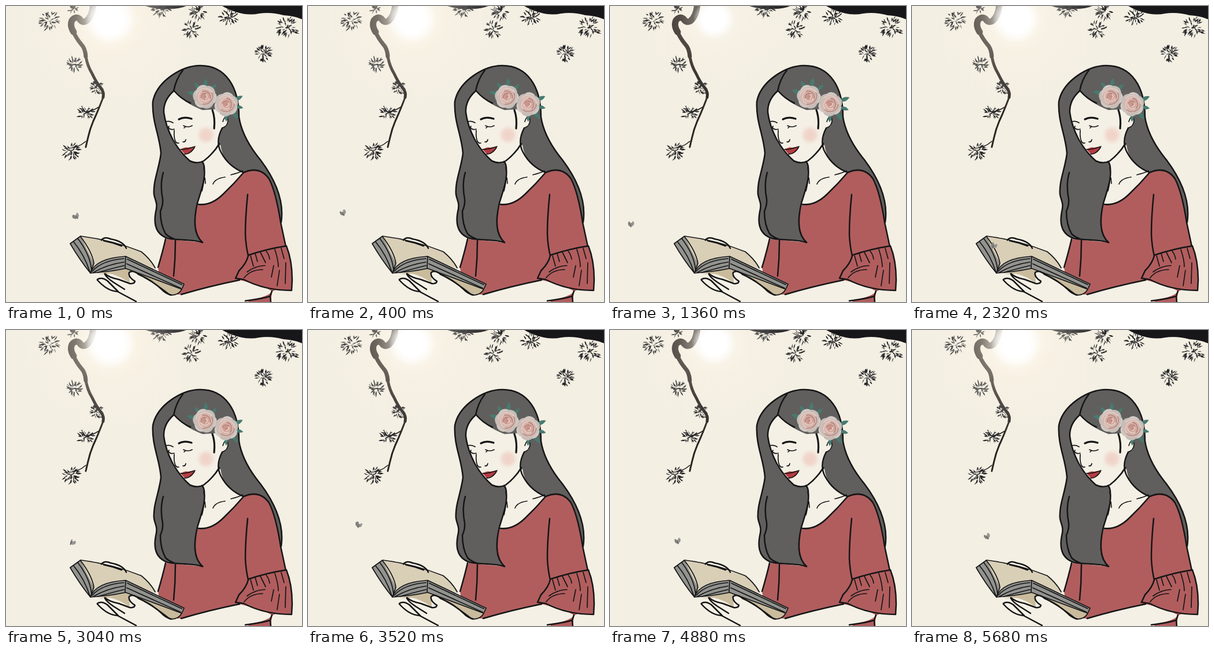
An HTML page for the animation above (5760 ms loop, 512 by 512 pixels).

```html
<!DOCTYPE html>
<html lang="en">
<head>
<meta charset="utf-8">
<title>Reading under the tree</title>
<style>
html, body { margin: 0; width: 100%; height: 100%; overflow: hidden; background: #f4efe3; }
svg { display: block; width: 100vw; height: 100vh; }
.ln { fill: none; stroke: #151516; stroke-width: 2.5; stroke-linecap: round; stroke-linejoin: round; }
.thin { stroke-width: 1.7; }
.bold { stroke-width: 3.2; }
.skin { fill: #f4f0e5; }
.hair { fill: #605f5d; }
.dress { fill: #b15d5e; }
.page { fill: #d9cfb7; }
.cover { fill: #c9bb9c; }
.edge { fill: #92928e; }
</style>
</head>
<body>
<svg viewBox="0 0 512 512">
  <defs>
    <radialGradient id="sun">
      <stop offset="0" stop-color="#fff"/>
      <stop offset=".55" stop-color="#fff"/>
      <stop offset="1" stop-color="#fff" stop-opacity="0"/>
    </radialGradient>
    <radialGradient id="haze">
      <stop offset="0" stop-color="#fff"/>
      <stop offset=".2" stop-color="#fffaf0" stop-opacity=".75"/>
      <stop offset=".35" stop-color="#fdf5e5" stop-opacity=".42"/>
      <stop offset=".6" stop-color="#faf4e6" stop-opacity=".2"/>
      <stop offset="1" stop-color="#f8f2e5" stop-opacity="0"/>
    </radialGradient>
    <radialGradient id="blush">
      <stop offset="0" stop-color="#f0d1c7"/>
      <stop offset=".5" stop-color="#f0d3c9" stop-opacity=".85"/>
      <stop offset="1" stop-color="#f3e2d8" stop-opacity="0"/>
    </radialGradient>
    <radialGradient id="petal">
      <stop offset="0" stop-color="#c28a80"/>
      <stop offset=".5" stop-color="#d6aea4"/>
      <stop offset="1" stop-color="#cbc0ba"/>
    </radialGradient>
  </defs>
  <rect width="512" height="512" fill="#f4efe3"/>

  <g id="tree" fill="#17171a">
    <path d="M374 0Q386 7 400 11Q420 17 438 13Q458 10 480 16Q498 17 512 23V0Z"/>
    <path d="M241 0Q262 7 283 5Q300 5 312 0Z"/>
    <g class="ln" style="stroke:#2a2421">
      <path stroke-width="11" style="stroke-width:11" d="M151-4Q150 17 139 26Q132 30 127 22Q120 17 114 25Q110 34 117 45"/>
      <path style="stroke-width:7" d="M117 45Q121 55 130 66Q137 73 138 87"/>
      <path style="stroke-width:5" d="M138 87Q141 104 149 117Q156 132 164 142Q170 149 168 158"/>
      <path style="stroke-width:3" d="M168 158Q159 182 151 199Q145 213 142 227L138 244"/>
      <path class="thin" d="M138 234Q125 246 106 246M160 175Q151 181 140 183M159 136L153 142M168 151L158 150"/>
    </g>
  </g>
  <circle id="haze-disc" cx="180" cy="22" r="170" fill="url(#haze)"/>
  <circle id="sun-disc" r="42" fill="url(#sun)"/>

  <!-- hair, face and dress -->
  <path class="hair" d="M336 103C304 103 261 130 254 165C252 200 266 224 268 255C265 281 254 303 256 326C258 337 263 341 259 356C254 382 262 396 280 402C300 406 321 403 340 409C323 394 325 367 331 341C339 315 345 299 343 270L371 240Q374 272 412 288L476 374C482 335 464 298 440 266C421 243 407 218 403 192C403 140 380 103 336 103Z"/>
  <path class="skin" d="M291 147Q272 163 273 184Q276 207 288 230Q300 252 318 268Q331 274 341 268Q345 284 343 298Q340 324 332 343Q350 346 372 329Q392 311 411 288Q383 277 370 249Q365 233 374 211Q386 209 384 191L370 178L340 180Q308 168 291 147Z"/>
  <path class="dress" d="M332 343Q355 345 376 325Q394 308 411 288Q439 276 455 299Q467 322 475 374L484 416L495 478L460 494L458 512H420L400 475L303 499H270L263 452Q271 425 276 403L340 409Q323 392 326 368Z"/>
  <g class="ln">
    <path d="M340 409C323 394 325 367 331 341C339 315 345 299 343 281Q343 273 339 269"/>
    <path d="M340 409C321 403 300 406 280 402C262 396 254 382 259 356C263 341 258 337 256 326C254 303 265 281 268 255C266 224 252 200 254 165C261 130 304 103 336 103C380 103 403 140 403 192C407 218 421 243 440 266C464 298 482 335 476 374"/>
    <path d="M306 111Q294 126 290 147Q272 163 273 184Q276 207 288 230Q300 252 318 268Q331 274 342 268Q359 255 369 238"/>
    <path d="M291 147Q303 161 319 168M374 211Q363 232 370 249Q383 277 411 288M272 288Q266 309 271 334Q272 344 267 355Q267 378 276 394Q282 400 291 403"/>
    <path class="bold" d="M357 180Q362 194 360 212"/>
    <path class="thin" d="M374 211Q387 207 383 190Q378 190 375 200M342 279Q345 296 339 320M344 297L345 307M358 308Q362 298 379 296M389 292Q402 289 409 285"/>
    <path d="M332 343Q355 346 376 325Q394 308 411 288Q439 276 455 299Q467 322 475 374L484 416"/>
    <path d="M418 326Q414 365 414 395Q415 416 419 432M293 406Q293 437 290 467M276 403Q271 425 263 452"/>
  </g>
  <circle cx="346" cy="223" r="18" fill="url(#blush)"/>
  <path d="M302 248Q310 243 315 245L327 243Q322 256 309 256Z" fill="#b43d43"/>
  <g class="ln thin">
    <path d="M302 248Q309 249 327 243M309 256Q318 257 326 245"/>
    <path d="M281 210Q284 215 291 213M282 208L280 211M307 207Q315 211 322 207M310 209L308 211"/>
    <path d="M291 215Q290 227 293 234Q295 238 299 237M306 235Q310 236 311 231"/>
    <path class="bold" d="M299 196Q308 191 321 195"/>
    <path d="M277 200Q283 198 289 202"/>
  </g>

  <!-- arm and sleeve -->
  <path class="skin" d="M303 499Q350 485 404 474L440 483L460 493Q456 503 414 510L400 512H225Q208 500 196 494Q175 492 159 474Q160 468 172 474L171 463L212 479L214 460L230 462Q262 480 283 500Z"/>
  <path class="dress" d="M419 431Q452 420 485 415Q495 440 495 474L494 492Q447 492 411 473L397 471Q400 457 414 444Z"/>
  <g class="ln">
    <path d="M303 499Q350 485 404 474M414 510Q440 507 457 502L460 493M457 502L458 512"/>
    <path d="M419 431Q452 420 485 415Q495 440 495 474L494 492Q447 492 411 473M419 432Q416 445 403 458L397 471L411 473"/>
    <path class="thin" d="M423 432L428 450M431 428L435 442M440 426L449 444M450 424Q455 430 456 438M465 421Q471 439 471 451M476 419L481 437M412 470Q423 456 444 456M417 460Q432 449 448 449M463 449L459 469M473 457L469 484M484 444L483 480"/>
  </g>

  <!-- book and hands -->
  <path class="skin" d="M165 405Q170 398 181 403Q203 407 208 419Z"/>
  <path class="page" d="M129 399Q184 405 234 425Q250 438 259 455L207 435Q177 433 152 453Z"/>
  <path class="cover" d="M160 464L206 451L306 489Q299 500 284 500Q259 481 240 470Q220 454 213 461L214 479Q195 466 180 463Z"/>
  <path class="edge" d="M111 411L129 398Q139 422 152 445L146 462Q128 440 111 411Z"/>
  <path class="edge" d="M146 462Q155 436 207 433L308 481L304 490L207 454Q178 459 146 462Z"/>
  <g class="ln thin">
    <path d="M111 411L129 398Q184 405 234 425Q250 438 258 453M111 411Q128 440 146 462Q178 460 207 454L304 490L308 481L207 433Q155 436 146 462M207 433L206 453"/>
    <path d="M129 399Q149 425 152 445L146 462M124 402Q145 429 148 456M117 408Q136 431 145 460"/>
    <path d="M149 459Q166 440 204 437M151 461Q175 447 204 443M159 461Q183 454 204 449"/>
    <path d="M210 438L304 482M209 446L302 488"/>
    <path d="M304 490Q298 501 284 500Q260 481 240 470"/>
  </g>
  <g class="ln">
    <path d="M165 405Q170 398 181 403Q203 407 208 419M169 406Q185 409 200 415"/>
    <path d="M171 463Q179 470 195 473L214 480Q222 481 223 476Q211 469 213 461Q219 456 229 464Q253 475 268 489Q276 498 286 500"/>
    <path d="M171 464Q174 470 186 478L205 490M158 473Q165 468 175 475L194 494M158 474Q175 493 193 494Q208 502 225 511"/>
  </g>

  <g id="leaves" fill="#487a70"></g>
  <g id="roses"></g>

  <g id="moth" fill="#81827e">
    <path id="wingA" d="M0 4C-9 3-9-5-4-6Q0-4 0 4Z"/>
    <path id="wingB" fill="#969691" d="M0 4C9 2 9-4 5-6Q0-4 0 4Z"/>
    <path d="M0 5L0-3" stroke="#5c5c5a" stroke-width="1.3"/>
  </g>
</svg>
<script>
const LOOP = 5760, STEP = 80, TAU = Math.PI * 2;
const $ = id => document.getElementById(id);
const move = (el, s) => el.setAttribute('transform', s);
const add = (parent, tag, attrs) => {
  const el = document.createElementNS('http://www.w3.org/2000/svg', tag);
  for (const k in attrs) el.setAttribute(k, attrs[k]);
  return parent.appendChild(el);
};
let seed = 7;
const rnd = () => (seed = (seed * 16807) % 2147483647) / 2147483647;

// A sprig is a few random twigs, each carrying a fan of pointed blades
function sprig(x, y, r) {
  let d = '';
  for (let i = 0; i < r * 2.6; i++) {
    const a = rnd() * TAU, dist = r * .85 * Math.sqrt(rnd());
    const len = 5 + rnd() * 5, w = 1 + rnd() * 1.3, dir = a + rnd() - .5;
    const px = x + Math.cos(a) * dist, py = y + Math.sin(a) * dist * .9;
    const c = Math.cos(dir), s = Math.sin(dir);
    const p = (u, v) => `${(px + c * u - s * v).toFixed(1)} ${(py + s * u + c * v).toFixed(1)}`;
    d += `M${p(-len / 2, 0)}Q${p(0, -w)} ${p(len / 2, 0)}Q${p(0, w)} ${p(-len / 2, 0)}`;
  }
  add($('tree'), 'path', { d, fill: '#252527' });
}
// Sprigs hang from the left branch, then along the top
[[75, 26, 20], [116, 5, 9], [118, 101, 15], [156, 141, 14], [138, 185, 16], [113, 252, 18]].forEach(s => sprig(...s));
[[268, 6, 18], [320, 41, 18], [333, 10, 17], [385, 19, 18], [445, 83, 18], [487, 37, 23]].forEach(s => sprig(...s));

const leaves = [];
function rose(x, y, r, turn, fan) {
  for (let i = 0; i < 4; i++) {
    const a = fan + i * 39, l = 17 - i % 2 * 2;
    const el = add($('leaves'), 'path', { d: `M15 0Q${15 + l * .45} ${-l * .4} ${15 + l} 0Q${15 + l * .45} ${l * .4} 15 0Z` });
    leaves.push({ el, x, y, a });
  }
  const g = add($('roses'), 'g', { transform: `translate(${x} ${y}) rotate(${turn})` });
  for (let i = 0; i < 6; i++)
    add(g, 'ellipse', { cx: r * .56, rx: r * .44, ry: r * .52, fill: i % 2 ? '#c3bcb7' : '#d2cac5', transform: `rotate(${i * 60})` });
  add(g, 'circle', { r: r * .82, fill: 'url(#petal)' });
  for (let i = 0; i < 7; i++) {
    const q = r * (.75 - i * .09);
    add(g, 'path', {
      d: `M${-q} 0A${q} ${q * .9} 0 0 1 ${q * .75} ${-q * .6}`, fill: 'none',
      stroke: i % 2 ? '#a9746c' : '#e2cac2', 'stroke-width': i % 2 ? 1.1 : 2,
      transform: `rotate(${i * 137})`
    });
  }
}
rose(344, 157, 21, 10, -165);
rose(381, 170, 21, 40, -27);

// Flight: time, x, y, joined by a smooth closed curve
const stops = [
  [0, 122, 364], [880, 2, 355], [1360, 36, 378], [2320, 141, 415],
  [3520, 88, 338], [4080, 101, 369], [5680, 130, 358]
];
const stop = i => {
  const n = stops.length, [t, x, y] = stops[(i + n) % n];
  return [t + Math.floor(i / n) * LOOP, x, y];
};
function flight(t) {
  const i = stops.findLastIndex(s => s[0] <= t);
  const [a, b, c, d] = [i - 1, i, i + 1, i + 2].map(stop);
  const span = c[0] - b[0], u = (t - b[0]) / span, ease = u * u * (3 - 2 * u);
  return [1, 2].map(k => {
    const m0 = (c[k] - a[k]) / (c[0] - a[0]) * span, m1 = (d[k] - b[k]) / (d[0] - b[0]) * span;
    return b[k] + (c[k] - b[k]) * ease + u * (1 - u) * ((1 - u) * m0 - u * m1);
  });
}

function draw() {
  const t = Math.floor(performance.now() % LOOP / STEP) * STEP;
  const wave = (1 + Math.cos(t / LOOP * 2 * TAU)) / 2, sway = 1 - wave;

  $('haze-disc').setAttribute('opacity', .45 + .55 * wave);
  move($('sun-disc'), `translate(180 23) scale(${.85 + .2 * wave})`);
  for (const { el, x, y, a } of leaves)
    move(el, `translate(${x + 2 * sway} ${y}) rotate(${a + 6 * sway}) scale(${1 + .05 * sway})`);

  const [x, y] = flight(t), flap = Math.cos(t / 320 * TAU);
  move($('moth'), `translate(${x} ${y}) rotate(${-30 * Math.cos(t / LOOP * TAU)}) scale(.95)`);
  move($('wingA'), `scale(${.68 + .32 * flap} 1)`);
  move($('wingB'), `scale(${.83 - .13 * flap} 1)`);
  requestAnimationFrame(draw);
}
draw();
</script>
</body>
</html>
```
